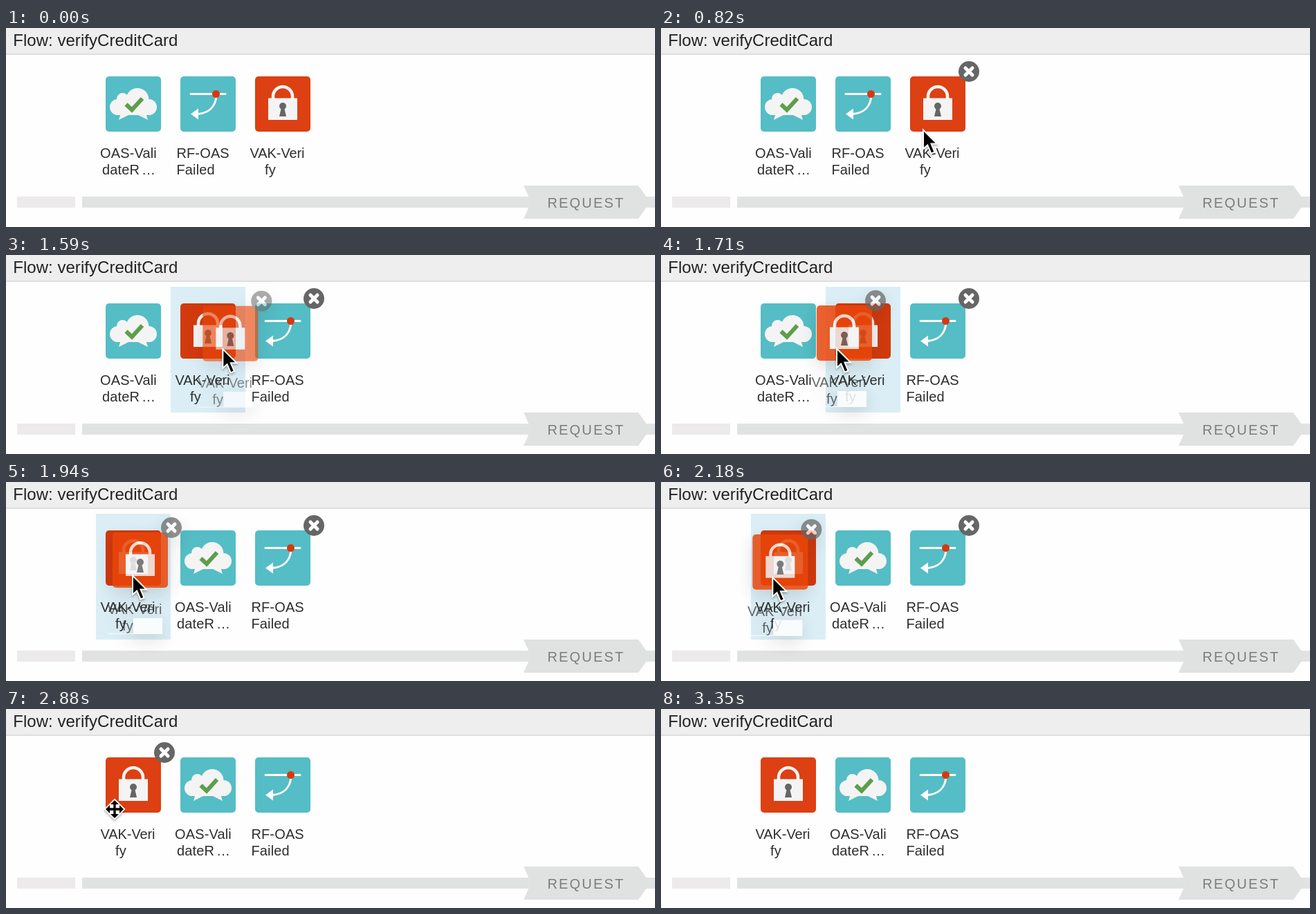
Animation, 938 px wide and 288 px high, one loop 4410 ms. Source, as an HTML page:

```html
<!DOCTYPE html>
<html lang="en">
<head>
<meta charset="utf-8">
<title>Reordering policies in a flow</title>
<style>
  html, body { margin: 0; width: 100%; height: 100%; overflow: hidden; background: #fefefe; }
  svg { display: block; width: 938px; height: 288px; }
  text { font-family: "Liberation Sans", Arial, Helvetica, sans-serif; fill: #2e2e2e; }
  .label { font-size: 20px; letter-spacing: .15px; }
  .tight { letter-spacing: -.1px; }
  .title { font-size: 24px; letter-spacing: .04px; fill: #222; }
  .request { font-size: 20px; letter-spacing: 2.2px; fill: #7c7c7c; }
  .teal { fill: #55bdc5; }
  .red { fill: var(--red); }
  #verify { --red: #dc4013; }
  #verify.dragging { --red: #d23a0e; }
  #ghost { --red: #e8460a; filter: drop-shadow(0 9px 13px rgba(0, 0, 0, .15)); }
  .faded { opacity: .85; }
  .cursor { filter: drop-shadow(0 2px 1.5px rgba(0, 0, 0, .3)); }
</style>
</head>
<body>
<svg viewBox="0 0 938 288">
  <defs>
    <g id="close">
      <circle r="15" fill="#666"/>
      <path d="M-5-5 5 5M5-5-5 5" stroke="#fff" stroke-width="5" stroke-linecap="round"/>
    </g>
  </defs>

  <rect width="938" height="37" fill="#eee"/>
  <rect y="37" width="938" height="2" fill="#dedede"/>
  <text class="title" x="10.2" y="26">Flow: verifyCreditCard</text>

  <rect x="16" y="244" width="84" height="16" fill="#eceaeb"/>
  <rect x="110" y="244" width="828" height="16" fill="#e1e3e2"/>
  <path d="M748 228H914L931 252 914 276H748L759 252Z" fill="#e0e2e1"/>
  <text class="request" x="782.4" y="259.7">REQUEST</text>

  <rect id="drop" y="46" width="108" height="182" fill="#dbeef5"/>

  <g id="validate">
    <rect class="teal" width="80" height="80" rx="5"/>
    <g fill="#f4f4f4">
      <circle cx="46" cy="33.5" r="16.5"/>
      <circle cx="24.5" cy="32.5" r="8.5"/>
      <circle cx="17.5" cy="44.5" r="11.5"/>
      <circle cx="62.5" cy="44.5" r="11.5"/>
      <path d="M17 36H63V56H17Z"/>
      <path d="M22 53 19 63 35 55Z"/>
      <path d="M58 53 61 63 45 55Z"/>
    </g>
    <path d="M29.5 40.5 38 48.5 53 32" fill="none" stroke="#5d9e4c" stroke-width="6"/>
    <text class="label" x="-8" y="118">OAS-Vali</text>
    <text class="label" x="-5" y="142">dateR</text>
    <text class="label" x="52" y="142">…</text>
  </g>

  <g id="failed">
    <rect class="teal" width="80" height="80" rx="5"/>
    <path d="M15 25.5H65M52 28C51 43 42 53 25 54.5" fill="none" stroke="#fff" stroke-width="3" stroke-linecap="round"/>
    <path d="M15 54.5 26 46.5V62.5Z" fill="#fff"/>
    <circle cx="51.5" cy="25.5" r="5.5" fill="#d8380e"/>
    <text class="label" x="-5.6" y="118">RF-OAS</text>
    <text class="label" x="-5.6" y="142">Failed</text>
  </g>

  <g id="verify">
    <g id="lock">
      <rect class="red" width="80" height="80" rx="5"/>
      <path d="M26 33V29a14 14 0 0 1 28 0V33" fill="none" stroke="#f4f4f4" stroke-width="4.5"/>
      <path d="M19 31.5H61V63H19Z" fill="#f4f4f4"/>
      <circle cx="40" cy="43" r="5" fill="#666"/>
      <path d="M38 45H42L45 58H35Z" fill="#666"/>
    </g>
    <g id="lockLabel">
      <text class="label tight" x="-7.4" y="118">VAK-Veri</text>
      <text class="label" x="14" y="142">fy</text>
    </g>
  </g>

  <use id="close3" href="#close" x="445" y="63"/>
  <use id="close1" href="#close" x="229" y="63"/>

  <g id="ghost">
    <use href="#lock"/>
    <path d="M30 124H72V147H30ZM-7 146H72V147H-7Z" fill="#fff"/>
    <use class="faded" href="#lockLabel"/>
    <use class="faded" href="#close" x="85" y="-7"/>
  </g>

  <g id="arrow" class="cursor">
    <path d="M1 2.5V30L7.2 24.4 12.4 36.7 17.6 34.5 12.5 22.6H21Z" stroke="#fff" stroke-width="2"/>
  </g>
  <g id="move" class="cursor">
    <path d="M0-15.5 15.5 0 0 15.5-15.5 0Z" fill="#fff"/>
    <path d="M0-13 6-7H1.7V-1.7H7V-6L13 0 7 6V1.7H1.7V7H6L0 13-6 7H-1.7V1.7H-7V6L-13 0-7-6V-1.7H-1.7V-7H-6Z"/>
  </g>
</svg>
<script>
  const TICKS = 75, RATE = 17 / 1000;
  const SLOTS = [144, 252, 360], TOP = 70;
  const GRAB = { x: 28, y: 60 };
  const DRAG = { from: 22, to: 41 };

  // Pointer path: [tick, x, y], straight between entries.
  const PATH = [
    [10, 359, 272], [11, 362, 245], [12, 366, 212], [14, 378, 145],
    [15, 383, 136], [16, 387, 131], [17, 388, 130], [21, 388, 130],
    [24, 376, 134], [25, 363, 134], [26, 342, 134], [29, 253, 133],
    [33, 182, 133], [34, 172, 134], [36, 162, 135], [39, 157, 137],
    [47, 157, 137], [48, 157, 139], [49, 157, 145], [50, 158, 156],
    [53, 165, 212], [55, 172, 265], [56, 175, 300]
  ];

  const el = id => document.getElementById(id);
  const show = (id, on) => { el(id).style.display = on ? "" : "none"; };
  const place = (id, x, y) => el(id).setAttribute("transform", `translate(${x} ${y})`);
  const within = (n, from, to) => n >= from && n < to;

  function pointer(n) {
    const i = PATH.findIndex(p => p[0] >= n);
    if (i < 1) return { x: PATH[0][1], y: PATH[0][2] };
    const [t0, x0, y0] = PATH[i - 1], [t1, x1, y1] = PATH[i];
    const k = (n - t0) / (t1 - t0);
    return { x: x0 + (x1 - x0) * k, y: y0 + (y1 - y0) * k };
  }

  // The list reacts one tick after the pointer crosses a slot edge.
  function targetSlot(n) {
    if (n < DRAG.from) return 2;
    if (n >= DRAG.to) return 0;
    const { x } = pointer(n - 1);
    return x < 238 ? 0 : x < 346 ? 1 : 2;
  }

  function draw(n) {
    const p = pointer(n), slot = targetSlot(n);
    const dragging = within(n, DRAG.from, DRAG.to);

    place("verify", SLOTS[slot], TOP);
    place("validate", SLOTS[slot === 0 ? 1 : 0], TOP);
    place("failed", SLOTS[slot === 2 ? 1 : 2], TOP);
    el("verify").classList.toggle("dragging", dragging);

    el("drop").setAttribute("x", SLOTS[slot] - 14);
    show("drop", within(n, 23, 43));
    show("close3", within(n, 12, 48));
    show("close1", within(n, 48, 54));

    show("ghost", dragging);
    place("ghost", p.x - GRAB.x, p.y - GRAB.y);
    el("ghost").style.opacity = .85 * Math.min(1, Math.max(0, (n - 21) / 8));

    const present = within(n, 10, 56);
    const overIcon = within(n, 15, DRAG.from) || within(n, DRAG.to, 50);
    show("arrow", present && !overIcon);
    show("move", present && overIcon);
    place("arrow", p.x, p.y);
    place("move", p.x, p.y);
  }

  const start = performance.now();
  function frame() {
    const t = performance.now() - start;
    draw(Math.floor((t + 5) * RATE) % TICKS);
    requestAnimationFrame(frame);
  }
  frame();
</script>
</body>
</html>
```
